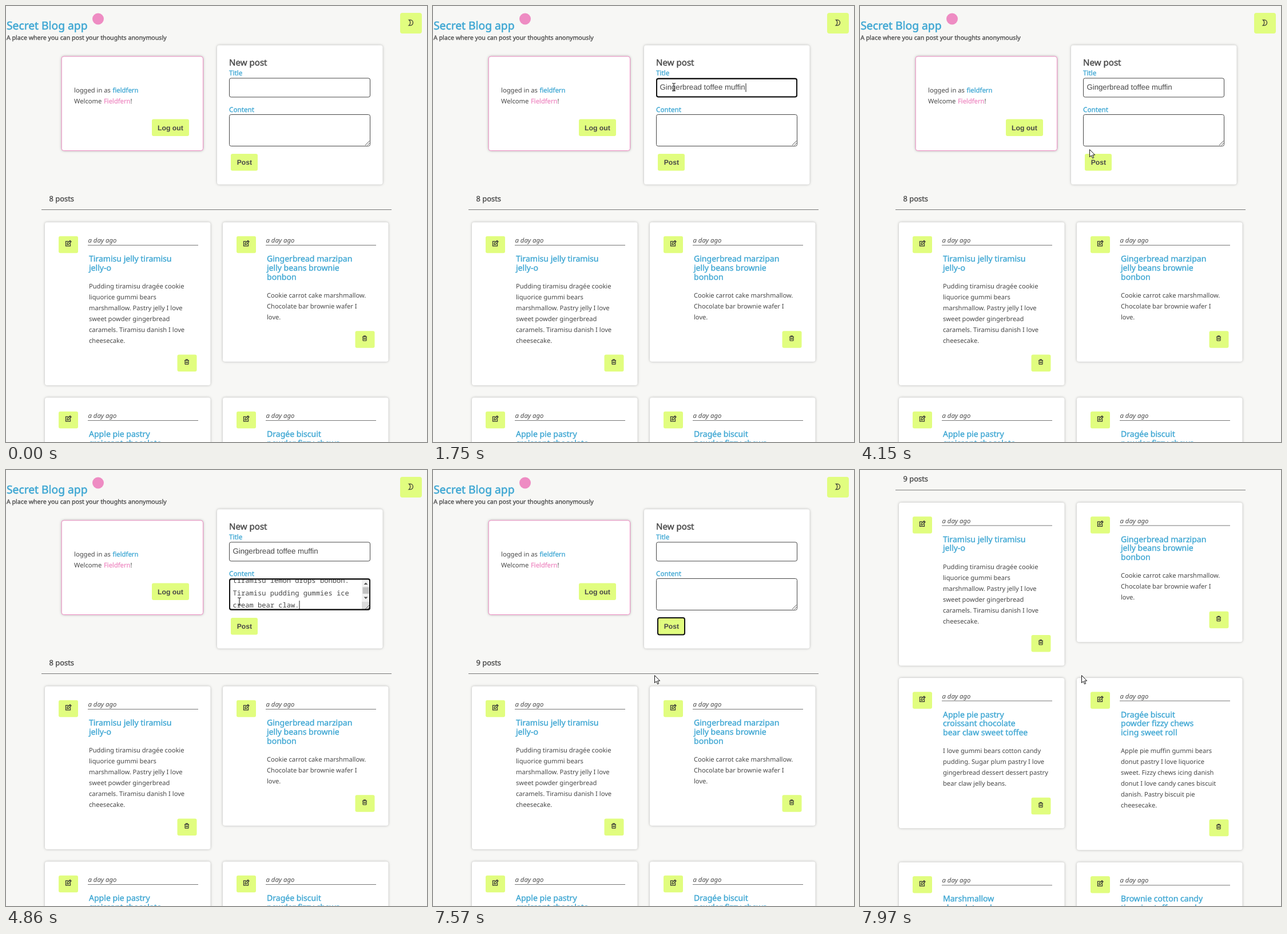
Write an HTML page that moves like this. It is 736 by 761 pixels and loops after 8 s.

```html
<!DOCTYPE html>
<html lang="en">
<head>
<meta charset="utf-8">
<title>Secret Blog app</title>
<style>
html, body { margin: 0; width: 100%; height: 100%; overflow: hidden; background: #f7f7f5; }
svg { display: block; text-rendering: geometricPrecision; }
text { font-family: "Noto Sans", "Open Sans", sans-serif; white-space: pre; }
.arial { font-family: "Liberation Sans", Arial, sans-serif; }
.mono { font-family: "Noto Sans Mono", "DejaVu Sans Mono", monospace; }
.italic { font-style: italic; }
.heavy { font-weight: 700; }
.card { fill: #fff; filter: drop-shadow(0 0 2px #0004); }
.icon { fill: none; stroke: #333; stroke-width: 1.2; }
</style>
</head>
<body>
<svg id="stage" width="736" height="761" viewBox="0 0 736 761"></svg>
<script>
const INK = '#484848', BLUE = '#3fa7d3', PINK = '#ee8cc3', LIME = '#e1fd7f';
const LOOP = 8000, TITLE_STEP = 15.75, BODY_STEP = 19;

const text = (x, y, size, str, { color = INK, semi = false, cls = '' } = {}) =>
  `<text x="${x}" y="${y}" font-size="${size}" fill="${color}" class="${cls}"` +
  (semi ? ` stroke="${color}" stroke-width="${size * 0.028}"` : '') + `>${str}</text>`;

const rect = (x, y, w, h, r, attrs) =>
  `<rect x="${x}" y="${y}" width="${w}" height="${h}" rx="${r}" ${attrs}/>`;

const button = (x, y, w, h, r = 3) => rect(x, y, w, h, r, `fill="${LIME}"`);
const card = (x, y, w, h, attrs = '') => rect(x, y, w, h, 4, `class="card" ${attrs}`);
const line = (x1, x2, y) => `<path d="M${x1} ${y}H${x2}" stroke="#777"/>`;
const icon = (x, y, d) => `<path class="icon" transform="translate(${x} ${y})" d="${d}"/>`;
const group = (id, content) => `<g id="${id}">${content}</g>`;

const lines = (x, y, step, size, list, opts) =>
  list.map((str, i) => text(x, y + i * step, size, str, opts)).join('');

const EDIT = 'M0-3.5H-4.5V4.5H3.5V0M-2 2V0L3-5L5-3L0 2ZM1.8-3.8L3.8-1.8';
const TRASH = 'M-4-3H4M-3-3V3Q-3 4 -2 4H2Q3 4 3 3V-3M-1.5-3V-4.3H1.5V-3M-1-1V2.3M1-1V2.3';

const cardHeight = ([title, body]) =>
  139 + title.length * TITLE_STEP + body.length * BODY_STEP;

function post(x, y, [title, body]) {
  const h = cardHeight([title, body]);
  return card(x, y, 289.5, h) +
    button(x + 24, y + 24.3, 34, 29.5) + icon(x + 41, y + 36.8, EDIT) +
    text(x + 75.5, y + 35.5, 11.3, 'a day ago', { cls: 'italic' }) +
    line(x + 75, x + 268, y + 40) +
    lines(x + 77, y + 68.5, TITLE_STEP, 14.05, title, { color: BLUE, semi: true }) +
    lines(x + 77, y + 84 + title.length * TITLE_STEP, BODY_STEP, 11.15, body) +
    button(x + 231.5, y + h - 53.5, 34, 29.5) + icon(x + 248, y + h - 40.5, TRASH);
}

const rows = [
  [[['Tiramisu jelly tiramisu', 'jelly-o'],
    ['Pudding tiramisu dragée cookie', 'liquorice gummi bears', 'marshmallow. Pastry jelly I love',
     'sweet powder gingerbread', 'caramels. Tiramisu danish I love', 'cheesecake.']],
   [['Gingerbread marzipan', 'jelly beans brownie', 'bonbon'],
    ['Cookie carrot cake marshmallow.', 'Chocolate bar brownie wafer I', 'love.']]],
  [[['Apple pie pastry', 'croissant chocolate', 'bear claw sweet toffee'],
    ['I love gummi bears cotton candy', 'pudding. Sugar plum pastry I love',
     'gingerbread dessert dessert pastry', 'bear claw jelly beans.']],
   [['Dragée biscuit', 'powder fizzy chews', 'icing sweet roll'],
    ['Apple pie muffin gummi bears', 'donut pastry I love liquorice', 'sweet. Fizzy chews icing danish',
     'donut I love candy canes biscuit', 'danish. Pastry biscuit pie', 'cheesecake.']]],
  [[['Marshmallow', 'chocolate cake'], ['Jelly beans.']],
   [['Brownie cotton candy', 'tiramisu toffee candy'], ['Sweet roll.']]]
];

function posts() {
  let y = 377.5, out = '';
  for (const [left, right] of rows) {
    out += post(68, y, left) + post(379, y, right);
    y += Math.max(cardHeight(left), cardHeight(right)) + 21.5;
  }
  return out;
}

const header =
  text(1, 41, 19.25, 'Secret Blog app', { color: BLUE, semi: true }) +
  `<circle cx="161" cy="22.5" r="10" fill="${PINK}"/>` +
  text(1, 59, 10.63, 'A place where you can post your thoughts anonymously', { semi: true }) +
  button(689, 12, 38, 36, 4) +
  icon(704.5, 24.3, 'M0 0H2.5C8.5 0 8.5 9.5 2.5 9.5H0C3 7.5 3 2 0 0Z');

const account =
  card(97.2, 88, 247.3, 164.5, `stroke="${PINK}"`) +
  text(119, 150.5, 11.2, 'logged in as') +
  text(186.5, 150.5, 11.3, 'fieldfern', { color: BLUE, semi: true }) +
  text(119, 169.5, 11.2, 'Welcome') +
  `<text x="171" y="169.5" font-size="11.2" fill="${INK}">` +
  `<tspan fill="${PINK}" stroke="${PINK}" stroke-width=".3">Fieldfern</tspan>!</text>` +
  button(255, 197.5, 65, 29.5) +
  text(265, 216.7, 12.25, 'Log out', { cls: 'arial heavy' });

const field = (y, h) => rect(390.5, y, 246, h, 3, `fill="#fff" stroke="${INK}"`);
const focus = (id, x, y, w, h) =>
  rect(x, y, w, h, 3, `id="${id}" fill="none" stroke="#101010" stroke-width="2"`);
const caret = (id, x, y) => `<path id="${id}" d="M${x} ${y}v15" stroke="#222"/>`;

const draft =
  '<clipPath id="area"><path d="M391 190.5H636V243.5H391Z"/></clipPath><g clip-path="url(#area)">' +
  lines(396.5, 197, 21.5, 12.1,
    ['tiramisu lemon drops bonbon.', 'Tiramisu pudding gummies ice', 'cream bear claw.'], { cls: 'mono' }) +
  '<path d="M622 190H636V230H622Z" fill="#f1f1f1"/><path d="M622 230H636V244H622Z" fill="#dcdcdc"/>' +
  '<path d="M623.5 204.5H634.5V216H623.5Z" fill="#c1c1c1"/>' +
  '<path d="M625.5 200L629 196.5L632.5 200ZM625.5 221.5L629 225L632.5 221.5Z" fill="#505050"/></g>';

const form =
  card(369, 68.5, 289.5, 243) +
  text(390, 104, 15.1, 'New post', { semi: true }) +
  text(390, 121, 11.7, 'Title', { color: BLUE, semi: true }) +
  field(126, 33) +
  group('title', text(396.5, 146, 13.2, 'Gingerbread toffee muffin', { cls: 'arial' })) +
  text(390, 184.5, 11.7, 'Content', { color: BLUE, semi: true }) +
  field(189.5, 55) +
  group('draft', draft) +
  '<path d="M628 243L635.5 235.5M632 243L635.5 239.5" stroke="#555"/>' +
  focus('titleFocus', 391, 127, 245, 31.5) +
  focus('draftFocus', 391, 190.5, 245, 53) +
  caret('emptyTitleCaret', 397.5, 135) + caret('titleCaret', 547, 135) +
  caret('emptyDraftCaret', 397.5, 196) + caret('draftCaret', 513, 228) +
  button(393, 258, 47, 29.5) +
  focus('postFocus', 393, 258, 47, 29.5) +
  text(403.7, 277, 12.15, 'Post', { cls: 'arial heavy' });

const count =
  group('before', text(75.5, 340.5, 12.9, '8 posts', { semi: true })) +
  group('after', text(75.5, 340.5, 12.9, '9 posts', { semi: true })) +
  line(62, 674, 355.5);

const pointer =
  '<circle id="click" r="10" fill="#ff0" fill-opacity=".47"/>' +
  '<path id="arrow" d="M.5.5V13.5L3.5 10.8L5.6 15.6L7.7 14.7L5.6 10H9.7Z" fill="#fff" stroke="#111"/>' +
  '<path id="beam" d="M-3-6.5H-1Q0-6.5 0-5.5Q0-6.5 1-6.5H3M0-5.5V5.5M-3 6.5H-1Q0 6.5 0 5.5Q0 6.5 1 6.5H3"' +
  ' fill="none" stroke="#111"/>';

document.getElementById('stage').innerHTML =
  group('page', header + account + form + count + posts()) + pointer;

const el = id => document.getElementById(id);
const show = (id, on) => el(id).setAttribute('visibility', on ? 'visible' : 'hidden');
const place = (id, x, y) => el(id).setAttribute('transform', `translate(${x} ${y})`);

// start, end, number of poses, from, to, rests as text beam
const moves = [
  [280, 430, 3, 665, 675, 588, 434, true],
  [680, 1060, 6, 565, 398, 421, 141, true],
  [2300, 2375, 2, 230, 215, 8, 297, false],
  [3770, 4150, 6, 181, 277, 401, 250, false],
  [4230, 4310, 2, 405, 238, 408, 229, true],
  [5320, 5700, 6, 409, 232, 417, 265, false],
  [7500, 7570, 2, 402, 312, 387, 358, false]
];

const clicks = [[1290, 1520, 419, 140], [4530, 4690, 407, 229], [5870, 6090, 417, 265]];

function movePointer(t) {
  const move = moves.filter(m => t >= m[0]).pop();
  const visible = move && !(t >= 2450 && t < 3770);
  let beam = false;
  if (visible) {
    const [start, end, poses, x0, y0, x1, y1, rest] = move;
    const u = Math.min(1, Math.floor((t - start) / (end - start) * (poses - 1) + 1e-6) / (poses - 1));
    const x = Math.round(x0 + (x1 - x0) * u), y = Math.round(y0 + (y1 - y0) * u);
    beam = rest && u === 1;
    place('arrow', x, y);
    place('beam', x, y + 0.5);
  }
  show('arrow', visible && !beam);
  show('beam', visible && beam);

  const click = clicks.find(([from, to]) => t >= from && t < to);
  show('click', !!click);
  if (click) place('click', click[2], click[3]);
}

const spans = {
  titleFocus: [1290, 2760], emptyTitleCaret: [1290, 1750], titleCaret: [1750, 2300], title: [1750, 6090],
  draftFocus: [4460, 5870], emptyDraftCaret: [4460, 4860], draftCaret: [4860, 5390], draft: [4860, 6090],
  postFocus: [5870, LOOP], before: [0, 6870], after: [6870, LOOP]
};

function frame() {
  const t = performance.now() % LOOP;
  for (const [id, [from, to]] of Object.entries(spans)) show(id, t >= from && t < to);
  place('page', 0, t < 7890 ? 0 : t < 7970 ? -67 : -320.5);
  movePointer(t);
  requestAnimationFrame(frame);
}
frame();
</script>
</body>
</html>
```
